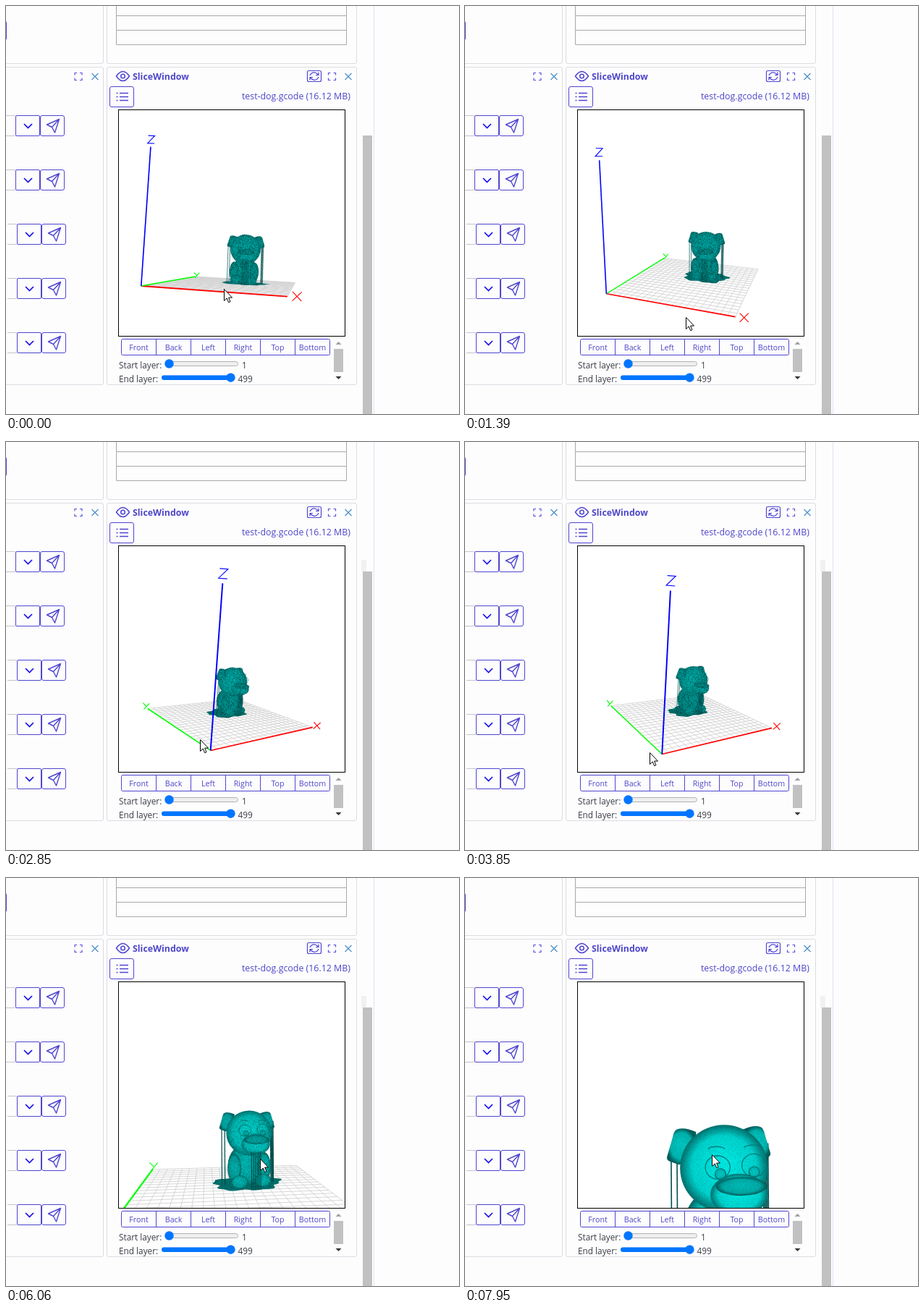
Write an HTML page with a canvas that moves like this. It is 626 by 564 pixels and loops after 8000 ms.

```html
<!DOCTYPE html>
<html lang="en">
<head>
<meta charset="utf-8">
<title>Toolpath preview</title>
<style>
html, body { margin: 0; width: 100%; height: 100%; overflow: hidden; background: #fdfdfe; }
svg, canvas { position: absolute; left: 0; top: 0; display: block; }
text { font-family: "Open Sans", "Noto Sans", sans-serif; }
</style>
</head>
<body>
<svg id="ui" width="626" height="564" viewBox="0 0 626 564" fill="none">
  <defs>
    <g id="expand" stroke="#5a52d6" stroke-width="1.2"><path d="M-5-2V-5H-2M2-5H5V-2M5 2V5H2M-2 5H-5V2"/></g>
    <g id="close" stroke="#4a90c8" stroke-width="1.2"><path d="M-4.5-4.5L4.5 4.5M4.5-4.5L-4.5 4.5"/></g>
    <g id="row">
      <path d="M-30-13.5H-17M-30 14.5H-17" stroke="#c4c4cc"/>
      <g stroke="#4f46d0">
        <rect x="-16.5" y="-13.5" width="33" height="28" rx="1.5"/>
        <rect x="17.5" y="-13.5" width="33" height="28" rx="2.5"/>
        <path d="M-5-2L.5 3.5L6-2" stroke="#1a10e8" stroke-width="1.7"/>
        <path d="M43.5-8.5L26.5-1L33.5 2.5L37.5 10ZM43.5-8.5L33.5 2.5" stroke-width="1.4" stroke-linejoin="round"/>
      </g>
    </g>
  </defs>
  <g stroke="#dcdce2">
    <path d="M0 79.5H132Q134.5 79.5 134.5 77V0M139.5 0V77Q139.5 79.5 142 79.5H482Q484.5 79.5 484.5 77V0"/>
    <path d="M0 84.5H132Q134.5 84.5 134.5 87V521Q134.5 523.5 132 523.5H0"/>
    <rect x="139.5" y="84.5" width="345" height="439" rx="2.5"/>
    <path d="M508.5 0V564" stroke="#dde3f0"/>
  </g>
  <path d="M152.5 0V53.5H470.5V0M152 13.5H471M152 33.5H471" stroke="#a9a9a9"/>
  <path d="M0 21.5Q.5 21.5 .5 24V44Q.5 46.5 0 46.5" stroke="#4f46d0"/>
  <rect id="trace" x="491" y="163" width="7" height="16" fill="#f1f1f1"/>
  <rect x="493" y="179" width="13" height="385" fill="#c1c1c1"/>
  <use href="#expand" x="100" y="97.5"/><use href="#close" x="123" y="97.5"/>
  <use href="#expand" x="450.5" y="97.5"/><use href="#close" x="473" y="97.5"/>
  <g stroke="#4f46d0" stroke-width="1.5">
    <path d="M152.5 97Q161.5 84 170.5 97Q161.5 110 152.5 97Z"/><circle cx="161.5" cy="97" r="2.8"/>
    <rect x="416.5" y="89.5" width="19" height="15" rx="2" stroke-width="1.2"/>
    <path d="M420 96Q422 91.5 426 91.8Q429 92 431.5 95M432 91.5V95.5H428M432 98Q430 102.5 426 102.3Q423 102 420.5 99M420 102.5V98.5H424" stroke-width="1.2"/>
    <rect x="143.5" y="111.5" width="33" height="28" rx="2.5" stroke-width="1"/>
    <path d="M157 120.5H169M157 125.5H169M157 130.5H169M152.5 120.5H154.5M152.5 125.5H154.5M152.5 130.5H154.5"/>
  </g>
  <g fill="#4f46c8">
    <text x="175" y="102" font-size="12.4" font-weight="700">SliceWindow</text>
    <text x="476" y="129" font-size="12.4" text-anchor="end">test-dog.gcode (16.12 MB)</text>
  </g>
  <rect x="155.5" y="143.5" width="313" height="313" fill="#fff" stroke="#000"/>
  <rect x="159.5" y="460.5" width="288" height="22" rx="2" stroke="#4f46d0"/>
  <path d="M207.5 461V482M255.5 461V482M303.5 461V482M351.5 461V482M399.5 461V482" stroke="#4f46d0"/>
  <g id="views" font-size="10.7" fill="#4f46c8" text-anchor="middle"></g>
  <rect x="453" y="474" width="13" height="32" fill="#c1c1c1"/>
  <path d="M455.5 468L459.5 464L463.5 468Z" fill="#a0a0a0"/>
  <path d="M455.5 512L459.5 516L463.5 512Z" fill="#333"/>
  <g fill="#3a3d45" font-size="11.8">
    <text x="156" y="501">Start layer:</text><text x="326" y="501">1</text>
    <text x="156" y="520">End layer:</text><text x="320.5" y="520">499</text>
  </g>
  <rect x="220.5" y="491.5" width="100" height="6" rx="3" fill="#efefef" stroke="#b2b2b2"/>
  <rect x="215" y="510.5" width="101" height="6.5" rx="3.2" fill="#0075ff"/>
  <circle cx="225.5" cy="494.5" r="6.2" fill="#0075ff"/><circle cx="310.5" cy="513.7" r="6.2" fill="#0075ff"/>
</svg>
<canvas id="stage" width="626" height="564"></canvas>
<script>
const LOOP = 8000, W = 626, H = 564, FOCAL = 404, CX = 312, CY = 300, RAD = Math.PI / 180;
const ctx = document.getElementById('stage').getContext('2d');
const trace = document.getElementById('trace');
const svgNode = (name, attrs, parent) => {
  const el = document.createElementNS('http://www.w3.org/2000/svg', name);
  for (const k in attrs) el.setAttribute(k, attrs[k]);
  return parent.appendChild(el);
};
['Front', 'Back', 'Left', 'Right', 'Top', 'Bottom'].forEach((label, i) => {
  svgNode('text', { x: 183.5 + 48 * i, y: 476 }, document.getElementById('views')).textContent = label;
});
for (let i = 0; i < 5; i++)
  svgNode('use', { href: '#row', x: i < 2 ? 30 : 32, y: 165 + 75 * i }, document.getElementById('ui'));

// Pointer moves: start, end, x, y; a drag also gives the yaw and pitch it reaches.
const REST = [301, 391, -15, -6];
const MOVES = [
  [30, 730, 355, 442, 2, 13], [880, 1390, 305, 430, -21, 10], [1390, 1620, 393, 414, 12, 3],
  [1770, 2310, 484, 416, 44, 3], [2520, 2850, 268, 411, 38, 5.5], [3100, 3450, 256, 429, 34, 9.3],
  [3800, 4600, 144, 414, -8, 7], [4630, 4800, 179, 398, 5, -0.3],
  [5110, 5380, 364, 389], [5540, 5700, 351, 388], [7430, 7560, 348, 402], [7840, 7940, 341, 382]
];
function pointerAt(t) {
  let now = REST;
  for (const [t0, t1, ...goal] of MOVES) {
    if (t <= t0) break;
    const p = Math.min(1, (t - t0) / (t1 - t0)), e = p * p * (3 - 2 * p);
    now = now.map((v, i) => v + ((goal[i] ?? v) - v) * e);
  }
  return now;
}

// Wheel bursts: each click, 40 ms apart, moves the camera 5 % closer.
const BURSTS = [[5540, 8], [6060, 4], [6520, 4], [7070, 4], [7840, 3]];
function distanceAt(t) {
  const clicks = BURSTS.reduce((sum, [t0, n]) =>
    sum + Math.max(0, Math.min(n, Math.floor((t - t0) / 40) + 1)), 0);
  return 2.435 * 0.95 ** clicks;
}

// Trackball camera around the middle of a unit cube on the plate; turning also tilts it.
function camera(yaw, pitch, dist) {
  const roll = (2.2 - 0.15 * Math.abs(yaw + 6) + 0.5 * Math.min(pitch, 0)) * RAD;
  const sy = Math.sin(yaw * RAD), cy = Math.cos(yaw * RAD);
  const sp = Math.sin(pitch * RAD), cp = Math.cos(pitch * RAD);
  const project = (a, b, z) => {
    const r = a * cy - b * sy, q = a * sy + b * cy, w = z - 0.5;
    const depth = Math.max(0.05, dist + q * cp - w * sp), k = FOCAL / depth;
    const x = r * k, y = -(w * cp + q * sp) * k;
    return { x: CX + x + roll * y, y: CY + y - roll * x, k, depth };
  };
  return { project, roll, dist };
}

function line(g, a, b, color, width) {
  g.strokeStyle = color;
  g.lineWidth = width;
  g.beginPath();
  g.moveTo(a.x, a.y);
  g.lineTo(b.x, b.y);
  g.stroke();
}

function drawGrid({ project }) {
  for (let i = 0; i <= 20; i++) {
    const v = i / 20 - 0.5;
    line(ctx, project(v, -0.5, 0), project(v, 0.5, 0), '#d2d2d2', 0.9);
    line(ctx, project(-0.5, v, 0), project(0.5, v, 0), '#d2d2d2', 0.9);
  }
}

const GLYPH = {
  X: new Path2D('M-1-1L1 1M1-1L-1 1'),
  Y: new Path2D('M-1-1L0 0M1-1L-.6 1'),
  Z: new Path2D('M-.8-1H.9L-.9 1H.9')
};
function drawAxis({ project, roll }, name, end, tag, color) {
  const a = project(-0.5, -0.5, 0), b = project(...end), c = project(...tag);
  const s = c.k * 0.028;
  line(ctx, a, b, color, Math.max(1.2, 6.8 / (a.depth + b.depth)));
  ctx.save();
  ctx.translate(c.x, c.y);
  ctx.rotate(-roll);
  ctx.scale(s, s);
  ctx.lineWidth = 1.1 / s;
  ctx.stroke(GLYPH[name]);
  ctx.restore();
}

const layer = document.createElement('canvas');
layer.width = W;
layer.height = H;
const dog = layer.getContext('2d');

function speckle(size) {
  const tile = document.createElement('canvas'), g = tile.getContext('2d');
  tile.width = tile.height = size;
  let seed = 7;
  const rnd = () => (seed = (seed * 16807) % 2147483647) / 2147483647;
  for (let i = 0; i < size * size; i++) {
    const v = rnd();
    g.fillStyle = v < 0.5 ? `rgba(0,45,44,${v * 1.3})` : `rgba(0,235,225,${(v - 0.5) * 0.5})`;
    g.fillRect(i % size, Math.floor(i / size), 1, 1);
  }
  return dog.createPattern(tile, 'repeat');
}
const grain = speckle(96);
const BALL = new Path2D();
BALL.arc(0, 0, 1, 0, 7);
const EAR = new Path2D('M1-.8Q.2-1.1-.3-.95Q-.5-.9-.6-.5L-1 .6Q-1 .8-.7 .85L-.2 1Q.1 1 .3 .6L1 .2Z');

function drawDog({ project, roll, dist }) {
  const near = Math.min(1, Math.max(0, (2.435 - dist) / 1.6));
  const turn = 7 * RAD, s = Math.sin(turn), c = Math.cos(turn);
  const place = (x, y, z) => project(0.099 + x * c - y * s, 0.094 + x * s + y * c, z);
  const teal = v => `rgb(0,${Math.round(v)},${Math.round(v * 0.975)})`;
  const thin = 0.7 + near * 0.9;
  const post = (x, y, z) => line(dog, place(x, y, z), place(x, y, 0), teal(78), thin);

  const shapes = [];
  const add = (x, y, z, w, h, tone, path = BALL) =>
    shapes.push({ p: place(x, y, z), w, h, tone, path });
  add(0, 0.03, 0.105, 0.108, 0.118, 0.9);        // body
  add(0.005, 0, 0.287, 0.128, 0.126, 1);         // head
  add(0.018, -0.085, 0.237, 0.076, 0.055, 1);    // muzzle
  add(0.018, -0.1, 0.263, 0.066, 0.024, 0.8);    // nose
  for (const side of [-1, 1]) {
    add(side * 0.085, -0.02, 0.1, 0.037, 0.08, 0.86);           // arm
    add(side * 0.065, -0.06, 0.035, 0.045, 0.036, 0.9);         // foot
    add(0.003 + side * 0.118, 0.03, 0.35, -side * 0.043, 0.053, 0.85, EAR);
    add(0.008 + side * 0.046, -0.1, 0.298, 0.015, 0.015, 0.86); // pupil
  }
  shapes.sort((a, b) => b.p.depth - a.p.depth);

  dog.clearRect(0, 0, W, H);
  dog.beginPath();
  for (let i = 0; i < 48; i++) {
    const a = i * Math.PI / 24, r = 1 + 0.09 * Math.sin(a * 5 + 1) + 0.06 * Math.sin(a * 11);
    const p = place(0.19 * r * Math.cos(a), 0.03 + 0.14 * r * Math.sin(a), 0.002);
    dog.lineTo(p.x, p.y);
  }
  dog.fillStyle = teal(108);
  dog.fill();

  for (let i = 0; i < 2; i++) post(-0.147 + i * 0.017, 0.02, 0.32);
  for (let i = 0; i < 5; i++) post(0.138 + i * 0.004, 0.02, 0.35);

  for (const { p, w, h, tone, path } of shapes) {
    const light = dog.createRadialGradient(0, -0.08, 0.1, 0, 0, 1);
    light.addColorStop(0, teal((160 + 72 * near) * tone));
    light.addColorStop(0.7, teal((148 + 62 * near) * tone));
    light.addColorStop(1, teal((118 - 8 * near) * tone));
    dog.save();
    dog.translate(p.x, p.y);
    dog.rotate(-roll);
    dog.scale(Math.abs(w) === w ? w * p.k : w * p.k, h * p.k);
    dog.fillStyle = light;
    dog.fill(path);
    dog.restore();
  }

  // Eye rims and brows
  dog.strokeStyle = teal(100 + 25 * near);
  dog.lineWidth = 0.5 + near * 0.8;
  for (const side of [-1, 1]) {
    const x = 0.008 + side * 0.05;
    const eye = place(x, -0.09, 0.313), brow = place(x, -0.08, 0.355);
    dog.beginPath();
    dog.ellipse(eye.x, eye.y, 0.032 * eye.k, 0.03 * eye.k, 0, 0, 7);
    dog.stroke();
    dog.beginPath();
    dog.ellipse(brow.x, brow.y, 0.024 * brow.k, 0.01 * brow.k, 0, 3.5, 5.9);
    dog.stroke();
  }
  for (let i = 0; i < 6; i++) post(-0.01 + i * 0.01, -0.1, 0.2);

  dog.globalCompositeOperation = 'source-atop';
  dog.globalAlpha = 0.7 - 0.5 * near;
  dog.fillStyle = grain;
  dog.fillRect(0, 0, W, H);
  dog.globalAlpha = 1;
  dog.globalCompositeOperation = 'source-over';
  ctx.drawImage(layer, 0, 0);
}

const ARROW = new Path2D('M.5 .5V16.5L4.2 13L6.7 18.7L9 17.7L6.6 12.1H11.5Z');
function drawPointer(x, y) {
  ctx.save();
  ctx.translate(Math.round(x), Math.round(y));
  ctx.fillStyle = '#fff';
  ctx.strokeStyle = '#000';
  ctx.lineWidth = 1;
  ctx.fill(ARROW);
  ctx.stroke(ARROW);
  ctx.restore();
}

function draw(t) {
  const [x, y, yaw, pitch] = pointerAt(t);
  const cam = camera(yaw, pitch, distanceAt(t));
  ctx.clearRect(0, 0, W, H);
  ctx.save();
  ctx.beginPath();
  ctx.rect(156, 144, 312, 312);
  ctx.clip();
  drawGrid(cam);
  drawAxis(cam, 'X', [0.5, -0.5, 0], [0.557, -0.5, 0.005], '#f00');
  drawAxis(cam, 'Y', [-0.5, 0.5, 0], [-0.5, 0.54, 0.01], '#0f0');
  drawDog(cam);
  drawAxis(cam, 'Z', [-0.5, -0.5, 1], [-0.5, -0.5, 1.055], '#00f');
  ctx.restore();
  drawPointer(x, y);
  trace.style.visibility = t >= 2310 ? 'visible' : 'hidden';
}

const start = performance.now();
function tick() {
  draw((performance.now() - start) % LOOP);
  requestAnimationFrame(tick);
}
tick();
</script>
</body>
</html>
```
